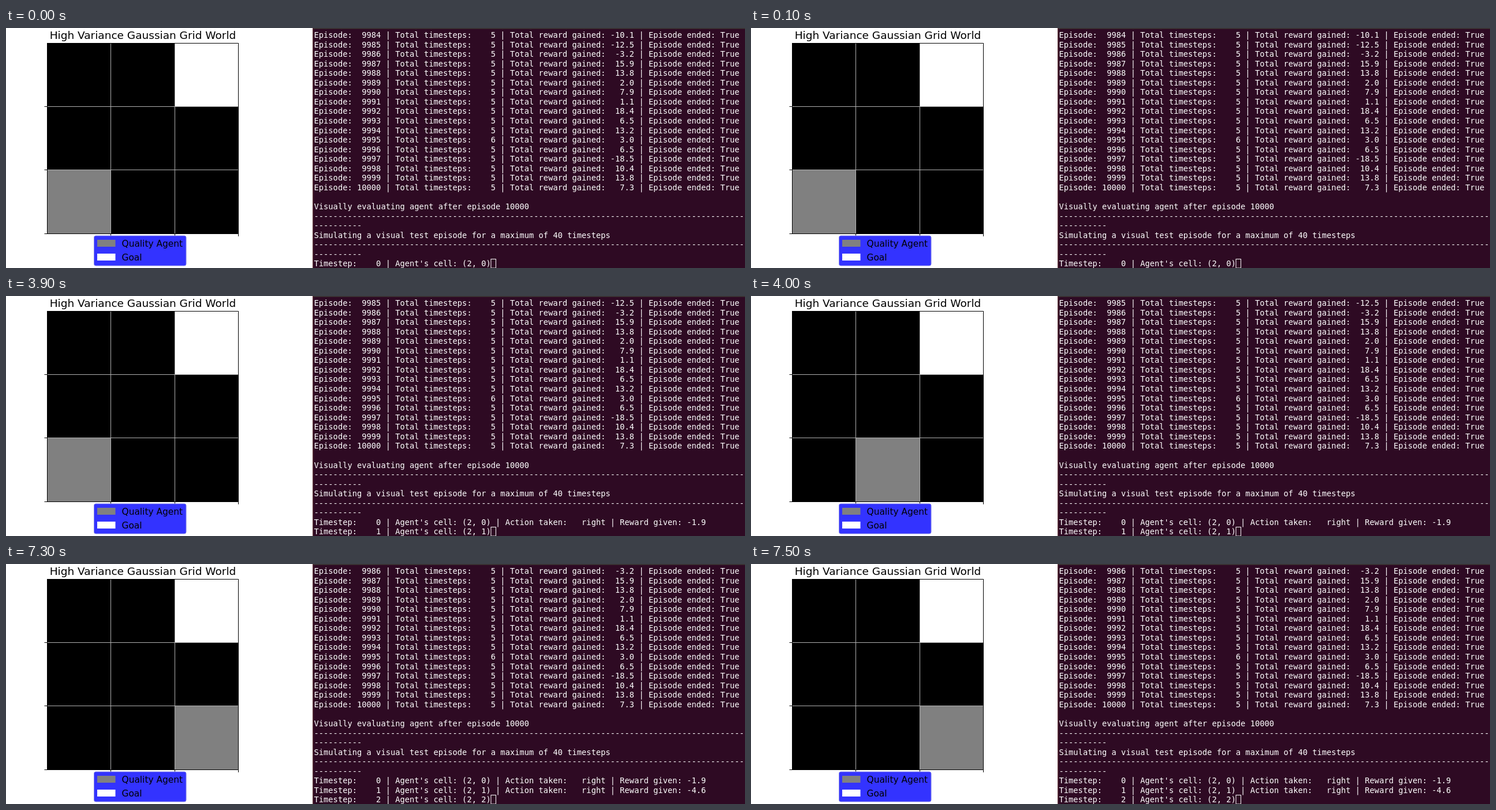
Write an HTML page that moves like this. It is 1280x417 px and loops after 8000 ms.

```html
<!DOCTYPE html>
<html lang="en">
<head>
<meta charset="utf-8">
<title>Grid World</title>
<style>
  html, body { margin: 0; width: 100%; height: 100%; overflow: hidden; background: #fff; }
  svg { display: block; width: 1280px; height: 417px; }
  text { font-family: "DejaVu Sans", sans-serif; }
  #log text { font: 13.75px "DejaVu Sans Mono", monospace; white-space: pre; fill: #fff; }
</style>
</head>
<body>
<svg viewBox="0 0 1280 417">
  <text x="237" y="18.5" font-size="18.5" text-anchor="middle">High Variance Gaussian Grid World</text>

  <rect x="71" y="26" width="332" height="332"/>
  <rect x="292" y="26" width="110.5" height="110.5" fill="#fff"/>
  <rect id="agent" y="247" width="110.5" height="110.5" fill="#808080"/>
  <path d="M181.5 26V358M292.5 26V358M71 136.5H403M71 246.5H403" stroke="#b0b0b0"/>
  <path d="M71.5 26.5H402.5V357.5H71.5ZM66.5 136.5H71M66.5 246.5H71M66.5 357.5H71M181.5 358V362M292.5 358V362M402.5 358V362"
        fill="none" stroke="#000"/>

  <rect x="152.5" y="361" width="159.5" height="52" rx="3" fill="#33f" stroke="#8585e8"/>
  <rect x="158" y="368" width="31.5" height="12" fill="#808080"/>
  <rect x="158" y="392" width="31.5" height="12" fill="#fff"/>
  <g font-size="15.42">
    <text x="200.5" y="379.5">Quality Agent</text>
    <text x="200.5" y="403.5">Goal</text>
  </g>

  <rect x="531" width="749" height="417" fill="#2e0a23"/>
  <rect x="531" width="749" height="1.5" fill="#3c3b37"/>
  <rect x="531" width="1.5" height="417" fill="#5a3038"/>
  <g id="log"></g>
  <rect x="840" y="401.5" width="8.5" height="15.5" fill="none" stroke="#fff"/>
</svg>
<script>
const LOOP = 8000, ROWS = 25, PITCH = 16.56, CELL = 110.5;
const FIRST = 9984;
const rewards = [-10.1, -12.5, -3.2, 15.9, 13.8, 2, 7.9, 1.1, 18.4, 6.5, 13.2, 3, 6.5, -18.5, 10.4, 13.8, 7.3];
const stepRewards = [-1.9, -4.6];

// start time, timestep in the log, column of the agent
const steps = [[0, 0, 0], [3900, 1, 0], [4000, 1, 1], [7300, 2, 2]];

const pad = (value, width) => String(value).padStart(width);

const episodes = rewards.map((reward, i) => {
  const n = FIRST + i;
  return `Episode: ${pad(n, 5)} | Total timesteps: ${pad(n === 9995 ? 6 : 5, 4)}` +
    ` | Total reward gained: ${pad(reward.toFixed(1), 5)} | Episode ended: True`;
});
const rule = ['-'.repeat(90), '-'.repeat(10)];
const header = [
  ...episodes, '',
  'Visually evaluating agent after episode 10000', ...rule,
  'Simulating a visual test episode for a maximum of 40 timesteps', ...rule
];

const cellText = n => `Timestep: ${pad(n, 4)} | Agent's cell: (2, ${n})`;

function logLines(now) {
  const done = stepRewards.slice(0, now).map((reward, n) =>
    `${cellText(n)} | Action taken: ${pad('right', 7)} | Reward given: ${reward.toFixed(1)}`);
  return [...header, ...done, cellText(now)].slice(-ROWS);
}

const log = document.getElementById('log');
const agent = document.getElementById('agent');
const rows = Array.from({ length: ROWS }, (_, i) => {
  const row = document.createElementNS('http://www.w3.org/2000/svg', 'text');
  row.setAttribute('x', 533.5);
  row.setAttribute('y', 17 + i * PITCH);
  return log.appendChild(row);
});

let shown;
function draw() {
  const t = performance.now() % LOOP;
  const step = steps.filter(([start]) => start <= t).pop();
  if (step !== shown) {
    shown = step;
    const [, timestep, column] = step;
    logLines(timestep).forEach((line, i) => { rows[i].textContent = line; });
    agent.setAttribute('x', 71.5 + column * CELL);
  }
  requestAnimationFrame(draw);
}
draw();
</script>
</body>
</html>
```
